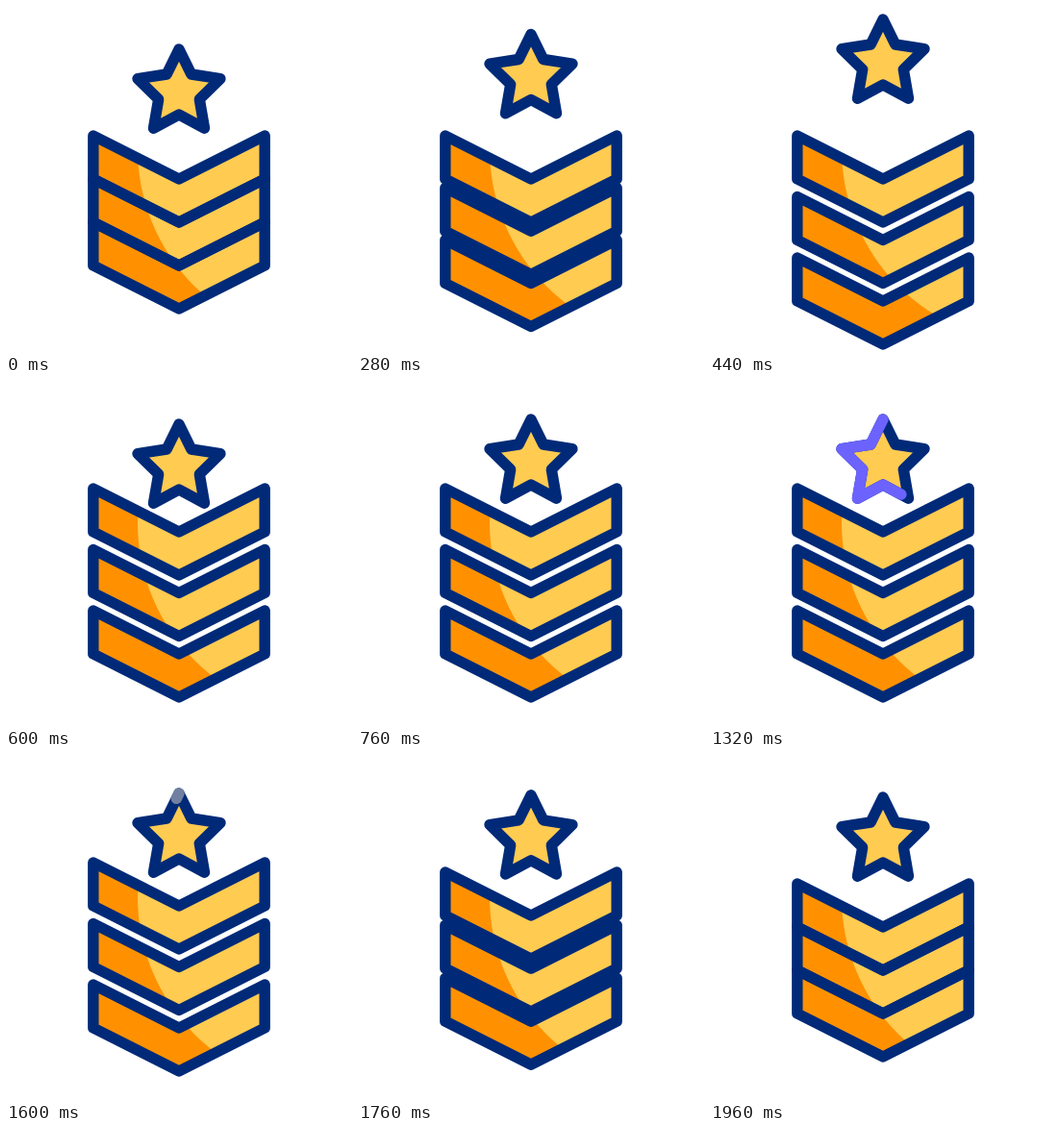
Recreate the animation shown at these times as an HTML page. Size 360 by 360 pixels, loop 2 s.

```html
<!DOCTYPE html>
<html lang="en">
<head>
<meta charset="utf-8">
<title>Rank badge</title>
<style>
  html, body { margin: 0; width: 100%; height: 100%; overflow: hidden; background: #fff; }
  svg { display: block; width: 100%; height: 100%; }
  .line { fill: none; stroke: #002a78; stroke-width: 11.4; stroke-linejoin: round; stroke-linecap: round; }
</style>
</head>
<body>
<svg viewBox="0 0 360 360">
  <defs>
    <path id="star" d="M180 45L192.800 71L223 75.700L201.300 97L206.500 127.200L180 113L153.500 127.200L158.700 97L137 75.700L167.200 71Z" pathLength="100"/>
    <path id="chevron" d="M90.800 0L180 45L269.200 0V45L180 90L90.800 45Z"/>
    <clipPath id="bands">
      <use class="band" href="#chevron"/>
      <use class="band" href="#chevron"/>
      <use class="band" href="#chevron"/>
    </clipPath>
  </defs>
  <g clip-path="url(#bands)">
    <rect width="360" height="360" fill="#ff9100"/>
    <circle cx="338.500" cy="149" r="201.500" fill="#ffcb51"/>
  </g>
  <g class="line">
    <use class="band" href="#chevron"/>
    <use class="band" href="#chevron"/>
    <use class="band" href="#chevron"/>
  </g>
  <g id="badge">
    <use href="#star" fill="#ffcb51"/>
    <use href="#star" class="line"/>
    <path id="trace" class="line" pathLength="100"/>
  </g>
</svg>
<script>
const LOOP = 2000, STEP = 40;
const bands = [...document.querySelectorAll('.band')];
const badge = document.getElementById('badge');
const trace = document.getElementById('trace');
trace.setAttribute('d', document.getElementById('star').getAttribute('d'));

// Keys are [time, value] pairs, eased in and out between neighbours.
const starY = [[120, 0], [440, -31], [600, 1], [680, -4], [1600, -4], [1940, 0]];
const bandY = [
  [[120, 135], [440, 135], [600, 113], [1600, 113], [1940, 135]],
  [[120, 180], [440, 198.5], [600, 176.5], [1600, 176.5], [1940, 180]],
  [[120, 225], [440, 262], [600, 240], [1600, 240], [1940, 225]]
];
const traceEnd = [[800, 0], [1200, 100]];
const traceStart = [[1100, 0], [1580, 98]];
const traceFade = [[1520, 0], [1600, 1]];

function valueAt(keys, t) {
  if (t <= keys[0][0]) return keys[0][1];
  for (let i = 1; i < keys.length; i++) {
    const [t0, a] = keys[i - 1], [t1, b] = keys[i];
    if (t < t1) {
      const p = (t - t0) / (t1 - t0);
      return a + (b - a) * p * p * (3 - 2 * p);
    }
  }
  return keys[keys.length - 1][1];
}

function mix(from, to, p) {
  return `rgb(${from.map((c, i) => Math.round(c + (to[i] - c) * p))})`;
}

function draw(t) {
  bands.forEach((band, i) =>
    band.setAttribute('transform', `translate(0 ${valueAt(bandY[i % 3], t)})`));
  badge.setAttribute('transform', `translate(0 ${valueAt(starY, t)})`);

  const start = valueAt(traceStart, t), end = valueAt(traceEnd, t);
  trace.style.display = end > start && t <= 1600 ? '' : 'none';
  trace.style.strokeDasharray = `${end - start} 200`;
  trace.style.strokeDashoffset = -start;
  trace.style.stroke = mix([108, 99, 255], [113, 128, 160], valueAt(traceFade, t));
}

const begin = performance.now();
function tick() {
  const t = (performance.now() - begin) % LOOP;
  draw(Math.floor(t / STEP) * STEP);
  requestAnimationFrame(tick);
}
tick();
</script>
</body>
</html>
```
